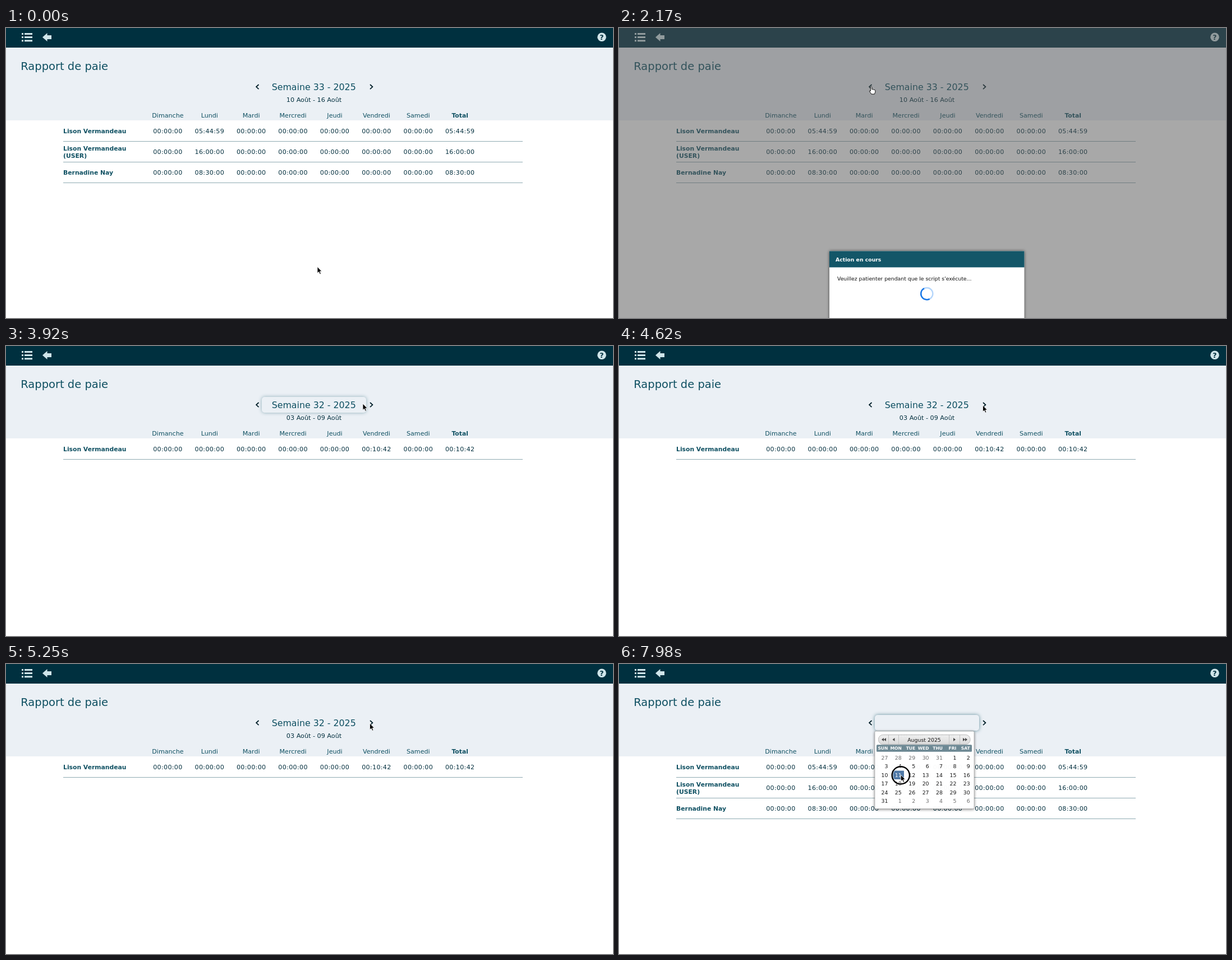
Write an HTML page that moves like this. It is 1082x518 px and loops after 8 s.

```html
<!DOCTYPE html>
<html lang="fr">
<head>
<meta charset="utf-8">
<title>Rapport de paie</title>
<style>
  html, body { margin: 0; width: 100%; height: 100%; overflow: hidden; background: #fff; }
  svg { display: block; }
  text { font: 11.1px "DejaVu Sans", Verdana, sans-serif; fill: #0f5062; white-space: pre; }
  .mid { text-anchor: middle; }
  .end { text-anchor: end; }
  .bold { font-weight: bold; }
  .name { font-size: 10.8px; }
  .time { letter-spacing: .33px; fill: #04303f; }
  .icon { fill: #d0e5ea; }
  .chev { fill: none; stroke: #021f29; stroke-width: 1.8; }
  .cal text { font-size: 9.4px; fill: #111; }
  .cal .other { fill: #6a6a6a; }
  .cal .dow { font-size: 7.6px; font-weight: bold; fill: #fff; }
  .cal .on { fill: #fff; }
</style>
</head>
<body>
<svg id="stage" width="1082" height="518" viewBox="0 0 1082 518"></svg>
<script>
const STEP = 70, LOOP = 8000;
const days = ['Dimanche', 'Lundi', 'Mardi', 'Mercredi', 'Jeudi', 'Vendredi', 'Samedi', 'Total'];
const text = (x, y, s, cls = '', style = '') =>
  `<text x="${x}" y="${y}" class="${cls}" style="${style}">${s}</text>`;
const rect = (x, y, w, h, fill, more = '') =>
  `<rect x="${x}" y="${y}" width="${w}" height="${h}" fill="${fill}" ${more}/>`;
const path = (d, more = '') => `<path d="${d}" ${more}/>`;
const colX = i => 288.4 + 74.4 * i;

// One table row: a single non-zero day, repeated in the total column
function row(i, names, day, value) {
  const y = 188 + 37.1 * i;
  const first = names.length > 1 ? y - 6 : y;
  return names.map((n, k) => text(102, first + 13 * k, n, 'bold name')).join('') +
    days.map((_, d) => text(colX(d), y, d === day || d === 7 ? value : '00:00:00', 'mid time')).join('') +
    rect(102, Math.round(201.8 + 37.1 * i), 819, 1, '#8eaab2');
}

function calendar() {
  let s = rect(456, 120, 177, 138.5, '#fff', 'rx="2" stroke="#aaa" stroke-width=".7" style="filter:drop-shadow(0 1px 2.5px #0008)"');
  s += rect(462.5, 126.5, 163.5, 17, 'url(#nav)', 'rx="8" stroke="#b8b8b8"');
  s += path('M480.5 127v16M498.5 127v16M588.5 127v16M607.5 127v16', 'stroke="#c4c4c4"');
  s += path('M472 132v6l-4-3zM476 132v6l-4-3zM491.5 132v6l-4-3zM596 132v6l4-3zM613 132v6l4-3zM617 132v6l4-3z', 'fill="#444"');
  s += text(544, 138.6, 'August 2025', 'mid');
  s += rect(459, 144.3, 170, 12.4, '#6b8792', 'rx="1.5"');
  s += rect(487, 191, 20.5, 14.5, '#4b76a5', 'stroke="#3d6693" stroke-width=".8"');
  const x = c => 479.4 + 24.4 * c;
  'SUN MON TUE WED THU FRI SAT'.split(' ').forEach((d, c) => s += text(x(c), 153.3, d, 'end dow'));
  for (let i = 0; i < 42; i++) {
    const n = i - 4, out = n < 1 || n > 31;
    const label = n < 1 ? n + 31 : n > 31 ? n - 31 : n;
    s += text(x(i % 7), 170.6 + 15.5 * Math.floor(i / 7), label, 'end ' + (out ? 'other' : n === 11 ? 'on' : ''));
  }
  return s;
}

const stage = document.getElementById('stage');
stage.innerHTML = `
  <defs><linearGradient id="nav" x2="0" y2="1"><stop stop-color="#f1f1f1"/><stop offset="1" stop-color="#d9d9d9"/></linearGradient></defs>
  ${rect(0, 0, 1082, 518, '#fff')}${rect(0, 35, 1082, 130, '#ebf0f5')}${rect(0, 0, 1082, 35, '#00303f')}
  ${path('M28 9h3v3h-3zM33 9h14v3h-14zM28 15h3v3h-3zM33 15h14v3h-14zM28 21.3h3v3h-3zM33 21.3h14v3h-14z', 'class="icon"')}
  ${path('M65 16.5L73.5 9v4H81v7h-7.5v4z', 'class="icon"')}
  <circle cx="1062" cy="16.3" r="7.8" class="icon"/>${text(1062, 20.8, '?', 'mid bold', 'font-size:12.5px;fill:#00303f')}
  ${text(26.2, 75.3, 'Rapport de paie', '', 'font-size:19.5px')}
  <rect id="field" x="456" y="91" width="186" height="28" rx="5" fill="#ebf0f5"/>
  ${path('M450.5 101l-4.4 4.1 4.4 4.1', 'class="chev"')}${path('M649 101l4.4 4.1-4.4 4.1', 'class="chev"')}
  ${text(548.7, 111, '', 'mid week', 'font-size:15.8px')}
  ${text(549, 132, '', 'mid dates', 'font-size:11.2px;fill:#04303f')}
  ${days.map((d, i) => text(colX(i), 160, d, i === 7 ? 'mid bold name' : 'mid')).join('')}
  <g id="rows33">${row(0, ['Lison Vermandeau'], 1, '05:44:59')}${row(1, ['Lison Vermandeau', '(USER)'], 1, '16:00:00')}${row(2, ['Bernadine Nay'], 1, '08:30:00')}</g>
  <g id="rows32">${row(0, ['Lison Vermandeau'], 5, '00:10:42')}</g>
  <g id="calendar" class="cal" opacity=".975">${calendar()}</g>
  <g id="wait">
    ${rect(0, 0, 1082, 518, '#565656', 'opacity=".514"')}
    ${rect(375, 398.5, 347.5, 170, '#fff', 'style="filter:drop-shadow(0 0 2.5px #0009)"')}
    ${rect(375, 398.5, 347.5, 29, '#135668')}
    ${text(386, 417.3, 'Action en cours', 'bold', 'font-size:9.3px;fill:#fff')}
    ${text(389, 451.3, "Veuillez patienter pendant que le script s'exécute...", '', 'font-size:9.3px;fill:#111')}
    <circle cx="548.8" cy="474.6" r="10.6" fill="none" stroke="#b5d6fb" stroke-width="2.4"/>
    ${path('M545.2 464.6A10.6 10.6 0 1 1 552.4 484.6', 'id="arc" fill="none" stroke="#1a78e6" stroke-width="2.4"')}
  </g>
  <g id="pointer">
    <g id="ring" fill="none"><circle cy=".8" r="15.6" stroke="#fff" stroke-width="4.5" opacity=".6"/><circle cy=".8" r="15.6" stroke="#000" stroke-width="2.4"/></g>
    ${path('M0 0V11.4L2.6 9 4.5 13.2 6.4 12.4 4.6 8.3H8Z', 'id="arrow" fill="#000" stroke="#fff" stroke-width=".8"')}
    ${path('M-1.2 1Q0-.6 1.2 1V5.2Q2.4 4.2 3.2 5.5 4.4 4.7 5.2 6 6.8 5.4 7.2 7V10L5.8 13.6H.4L-3.2 8.6Q-3-.2 6.8-1.2 8.4Z'.replace('Q-3-.2 6.8-1.2 8.4', 'Q-3 6.6-1.2 8.2'), 'id="hand" fill="#fff" stroke="#111" stroke-width="1"')}
  </g>`;

const $ = id => document.getElementById(id);
const week = stage.querySelector('.week'), dates = stage.querySelector('.dates');
const show = (el, on) => el.style.display = on ? '' : 'none';
const within = (t, a, b) => t >= a && t < b;
const clamp = v => Math.max(0, Math.min(1, v));

// Pointer moves: start, end, target x, target y
const moves = [
  [70, 280, 555, 393], [420, 1050, 448, 101], [1330, 1540, 449.6, 104.5],
  [3500, 3920, 636, 103], [4060, 4410, 648.5, 106], [5320, 5600, 585, 105],
  [6790, 7140, 507.5, 202], [7490, 7840, 502.3, 198]
];
function pointerAt(t) {
  let x = 555, y = 426.5;
  for (const [a, b, tx, ty] of moves) {
    const p = clamp((t - a) / (b - a)), e = p * p * (3 - 2 * p);
    x += (tx - x) * e;
    y += (ty - y) * e;
  }
  return [x, y];
}
const veil = (t, a, b) => clamp((t - a) / STEP) * clamp((b - t) / 140);

function draw(now) {
  const real = now % LOOP, t = Math.floor(real / STEP) * STEP;
  const [x, y] = pointerAt(t);
  const previous = within(t, 3080, 5740), editing = t >= 5950, open = t >= 6020;

  show($('rows33'), !previous);
  show($('rows32'), previous);
  week.textContent = editing ? '' : `Semaine ${previous ? 32 : 33} - 2025`;
  dates.textContent = previous ? '03 Août - 09 Août' : '10 Août - 16 Août';
  show($('calendar'), open);

  const hover = x > 456 && x < 642 && y > 91 && y < 119;
  show($('field'), hover || editing);
  $('field').style.filter = `drop-shadow(0 0 3px ${editing ? '#135668a8' : '#13566870'})`;

  const wait = Math.max(veil(t, 1820, 2450), veil(t, 4620, 5180));
  show($('wait'), wait > 0);
  $('wait').setAttribute('opacity', wait);
  $('arc').setAttribute('transform', `rotate(${(t - 4690) * .36} 548.8 474.6)`);

  const hand = within(t, 1400, 3570);
  $('pointer').setAttribute('transform', `translate(${x} ${y})`);
  show($('hand'), hand);
  show($('arrow'), !hand);
  show($('ring'), within(t, 1190, 1260) || within(t, 4550, 4620) || within(t, 5810, 5880) || t >= 7910);
  requestAnimationFrame(() => draw(performance.now()));
}
draw(performance.now());
</script>
</body>
</html>
```
